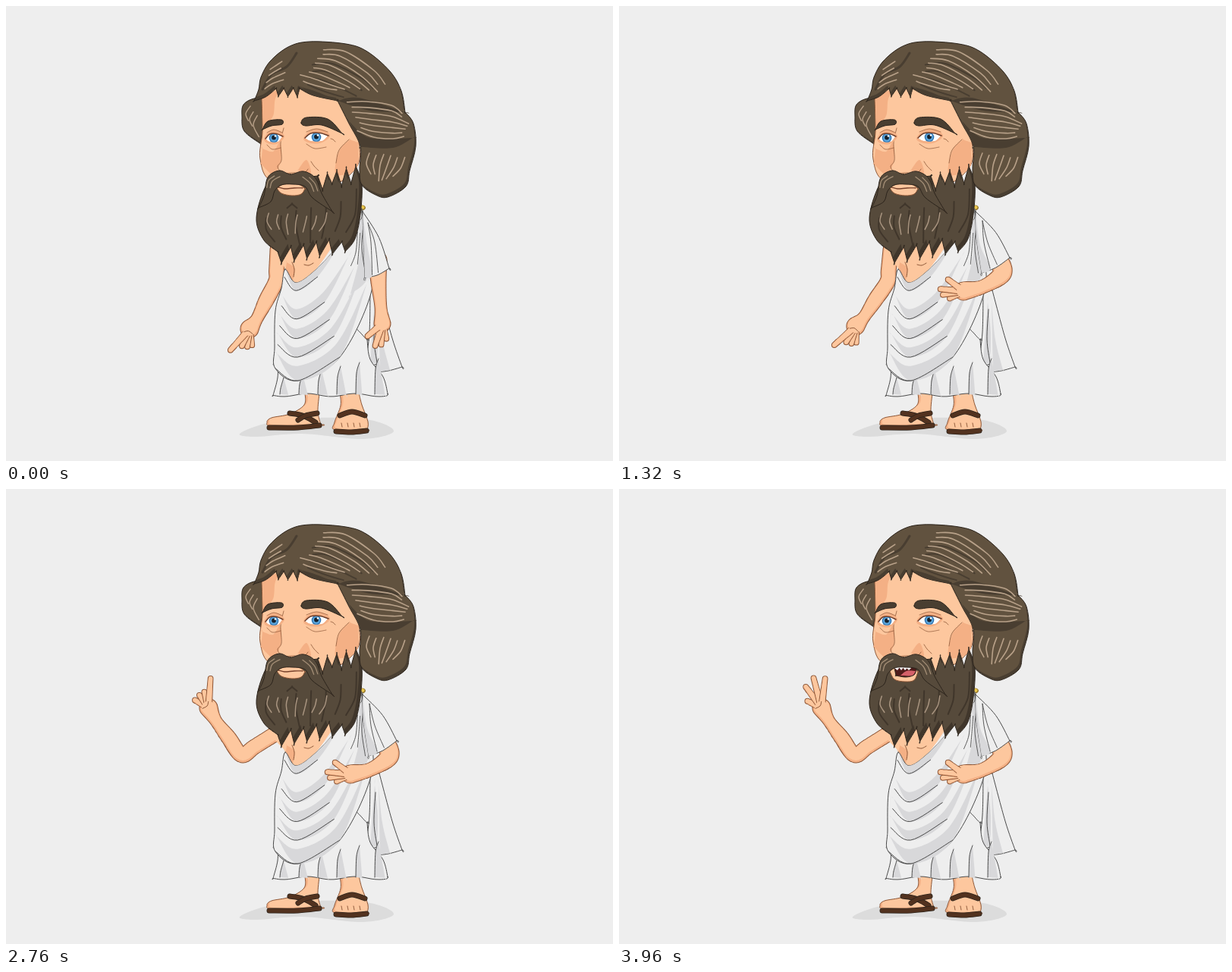
An HTML page with a canvas for the animation above (4.04 s loop, 800 by 600 pixels).

```html
<!DOCTYPE html>
<html lang="en">
<head>
<meta charset="utf-8">
<title>Talking philosopher</title>
<style>
html, body { margin: 0; width: 100%; height: 100%; overflow: hidden; background: #eee; }
canvas { display: block; width: 800px; height: 600px; }
</style>
</head>
<body>
<canvas id="stage" width="800" height="600"></canvas>
<script>
const ctx = document.getElementById('stage').getContext('2d');
const LOOP = 4040, TICK = 40;
const SKIN = '#fdc79e', SKIN2 = '#f4b085', SKINLINE = '#8b5637';
const HAIR = '#61523f', HAIR2 = '#493e31', BEARD = '#564a3b', BEARD2 = '#40362b';
const INK = '#2c241c', STRAND = '#b8a189', SOLE = '#52321f';
const CLOTH = '#eeeeee', CLOTH2 = '#d8d8da', CLOTHLINE = '#4b4b4b';

const unit = (t, a, b) => Math.max(0, Math.min(1, (t - a) / (b - a)));
const ease = (t, a, b) => { const u = unit(t, a, b); return u * u * (3 - 2 * u); };
const lerp = (a, b, k) => a.map((v, i) => v + (b[i] - v) * k);
const mix = (a, b, k) => a.map((p, i) => lerp(p, b[i], k));
const polar = ([x, y], deg, r) => [x + r * Math.cos(deg * Math.PI / 180), y + r * Math.sin(deg * Math.PI / 180)];
const noise = i => { const v = Math.sin(i * 12.9898 + 4) * 43758.5; return v - Math.floor(v); };

// Points are "x,y"; a trailing "!" marks a sharp corner.
const parse = s => s.split(' ').flatMap(p => {
  const q = p.replace('!', '').split(',').map(Number);
  return p.endsWith('!') ? [q, q] : [q];
});

// Sharp teeth from a to b; the gaps between them are moved by (dx, dy).
function teeth(a, b, n, dx, dy) {
  const pts = [];
  for (let i = 0; i < n; i++) {
    const tip = lerp(a, b, i / (n - 1));
    pts.push(tip, tip);
    if (i < n - 1) {
      const [x, y] = lerp(a, b, (i + .5) / (n - 1));
      const gap = [x + dx, y + dy * (.8 + .4 * noise(i + n))];
      pts.push(gap, gap);
    }
  }
  return pts;
}

function curve(src, closed) {
  const pts = typeof src === 'string' ? parse(src) : src;
  const path = new Path2D(), n = pts.length;
  const at = i => closed ? pts[(i + n) % n] : pts[Math.max(0, Math.min(n - 1, i))];
  path.moveTo(...pts[0]);
  for (let i = 0; i < (closed ? n : n - 1); i++) {
    const [a, b, c, d] = [at(i - 1), at(i), at(i + 1), at(i + 2)];
    path.bezierCurveTo(b[0] + (c[0] - a[0]) / 6, b[1] + (c[1] - a[1]) / 6,
      c[0] - (d[0] - b[0]) / 6, c[1] - (d[1] - b[1]) / 6, c[0], c[1]);
  }
  if (closed) path.closePath();
  return path;
}

function line(src, color, width = 1) {
  ctx.strokeStyle = color;
  ctx.lineWidth = width;
  ctx.stroke(curve(src, false));
}

// Fills a closed shape; with a shade, the main colour is shifted inside it.
function shape(src, fill, edge, shade, dx = 0, dy = 0) {
  const path = curve(src, true);
  ctx.save();
  if (shade) {
    ctx.clip(path);
    ctx.fillStyle = shade;
    ctx.fill(path);
    ctx.translate(dx, dy);
  }
  ctx.fillStyle = fill;
  ctx.fill(path);
  ctx.restore();
  if (edge) {
    ctx.strokeStyle = edge;
    ctx.lineWidth = 1;
    ctx.stroke(path);
  }
}

function band(src, color) {
  line(src, INK, 7);
  line(src, color, 5.4);
}

function oval(x, y, rx, ry, fill) {
  ctx.beginPath();
  ctx.ellipse(x, y, rx, ry, 0, 0, 7);
  ctx.fillStyle = fill;
  ctx.fill();
}

// A family of n locks between two guide curves, with uneven ends.
function locks(from, to, n, color, width) {
  const a = parse(from), b = parse(to);
  for (let i = 0; i < n; i++) {
    const pts = mix(a, b, i / (n - 1)), end = pts.length - 1;
    pts[0] = lerp(pts[0], pts[1], .5 * noise(i));
    pts[end] = lerp(pts[end], pts[end - 1], .5 * noise(i + 9));
    line(pts, color, width);
  }
}

// A rounded limb through joints [x, y, radius].
function limb(joints) {
  const dots = [], last = joints.length - 1;
  joints.slice(0, -1).forEach((b, i) => {
    const c = joints[i + 1], a = joints[Math.max(0, i - 1)], d = joints[Math.min(last, i + 2)];
    for (let u = 0; u <= 1; u += 1 / 24) {
      dots.push(b.map((v, j) => v + u / 2 * (c[j] - a[j] +
        u * (2 * a[j] - 5 * v + 4 * c[j] - d[j] + u * (3 * v - a[j] - 3 * c[j] + d[j])))));
    }
  });
  const pass = (color, grow, dy) => {
    ctx.beginPath();
    for (const [x, y, r] of dots) {
      ctx.moveTo(x + r + grow, y + dy);
      ctx.arc(x, y + dy, r + grow, 0, 7);
    }
    ctx.fillStyle = color;
    ctx.fill();
  };
  const inset = joints[last][2] < 6 ? .8 : 1.8;
  pass(SKINLINE, .5, 0);
  pass(SKIN2, -.5, 0);
  pass(SKIN, -inset, .5 - inset);
}

// Fingers are [angle from the hand, length].
function hand(palm, deg, fingers) {
  for (const [turn, length] of [...fingers].reverse()) {
    limb([[...polar(palm, deg + turn, 5), 4.4], [...polar(palm, deg + turn, length - 3.5), 3.4]]);
  }
  oval(palm[0], palm[1], 9, 9, SKIN);
}

function ground() {
  ctx.fillStyle = '#eeeeee';
  ctx.fillRect(0, 0, 800, 600);
  shape('308,564 345,550 410,543 480,546 511,561 470,571 390,564 330,568', '#dcdcdc');
}

function feet() {
  shape('394,510! 393,526 374,538 350,543 344,549 352,554 415,552! 411,535 413,510!', SKIN, SKINLINE, SKIN2, 3, -2);
  band('374,537 391,540 408,549', SOLE);
  band('410,537 395,540 385,546', SOLE);
  band('347,556 385,556 413,553', SOLE);
  shape('440,510! 441,527 433,549 434,559 476,559! 477,548 469,526 465,510!', SKIN, SKINLINE, SKIN2, 3, -2);
  band('440,540 456,535 473,540', SOLE);
  for (let x = 442; x < 472; x += 8) line([[x, 550], [x + 1, 555]], SKINLINE);
  band('435,561 455,562 475,560', SOLE);
}

function skirt() {
  shape('480,372! 479,430 474,471! 481,474 489,472! 487,483! 504,481 522,476! 509,438 492,375!', CLOTH, CLOTHLINE);
  shape('486,390! 480,470! 489,472! 490,430', CLOTH2);
  shape('491,390! 496,440 506,480! 493,482!', CLOTH2);
  line('487,400 485,440 489,470', CLOTHLINE);
  const hem = [];
  for (let x = 352; x <= 503; x += 10) hem.push([x, 513 + 2 * Math.sin((x - 350) / 10)]);
  shape([...parse('476,440! 440,420 358,470! 358,490'), hem[0], ...hem, [503, 511], [503, 511], ...parse('497,489 480,466')], CLOTH, CLOTHLINE);
  for (let i = 0; i < 6; i++) {
    const x = 364 + i * 25, top = 490 - i * 5, wide = 5 + 6 * noise(i + 2);
    const side = [[x + 2, top], [x - 2, top + 14], [x - 3, 512]];
    shape([side[0], ...side, side[2], [x + wide, 513], [x + wide, 513]], CLOTH2);
    line(side, CLOTHLINE);
  }
}

const NECK = parse('368,347 382,365 408,348 440,314');
const WAIST = parse('355,478 385,494 440,463 482,375');

function wrap() {
  shape('354,314! 353,328 366,343! 378,363 400,358 442,300!', SKIN);
  shape('370,338! 380,346 378,362! 368,352!', SKIN2);
  line('377,338 380,347 379,357', SKINLINE);
  line('393,341 399,342 405,339', SKINLINE);
  shape([...NECK, ...parse('466,285 469,271! 477,310'), ...[...WAIST].reverse(), ...parse('354,450 355,402 363,372')], CLOTH, CLOTHLINE);
  for (const [u, depth] of [[0, .08], [.27, .1], [.47, .1], [.66, .1], [.85, .15]]) {
    const a = mix(NECK, WAIST, u), b = mix(NECK, WAIST, u + depth);
    shape([a[0], ...a, a[3], b[2], b[1]], CLOTH2);
    line(b.slice(0, 3), CLOTHLINE);
  }
  shape('464,285! 467,325 454,380! 476,360 477,320 470,280!', CLOTH2);
  locks('464,290 461,325 450,355', '471,285 469,320 474,355', 3, CLOTHLINE, .9);
  oval(469, 266, 5, 3.5, '#927425');
  oval(468.5, 265.5, 4, 2.5, '#edc94f');
}

// Hanging, half raised and resting on the belly.
const REST = [
  { arm: [[490, 335, 12], [491, 365, 10], [494, 398, 8], [496, 419, 11]], turn: 95, hem: [[505, 346], [473, 358]] },
  { arm: [[496, 335, 13], [499, 356, 12], [486, 385, 10], [467, 411, 12]], turn: 165, hem: [[511, 333], [477, 352]] },
  { arm: [[500, 335, 13], [505, 353, 12], [480, 370, 9], [454, 376, 12]], turn: 172, hem: [[515, 332], [478, 352]] }
];
const RELAXED = [[45, 29], [13, 34], [-2, 31], [-20, 24]];

function restArm(t) {
  const i = t < 920 ? 0 : 1, from = REST[i], to = REST[i + 1];
  const k = i ? ease(t, 920, 1200) : ease(t, 440, 640);
  const arm = mix(from.arm, to.arm, k), [out, inn] = mix(from.hem, to.hem, k);
  limb(arm);
  hand(arm[3].slice(0, 2), from.turn + (to.turn - from.turn) * k, RELAXED);
  const top = [470, 271], edge = lerp(top, out, .5), hem = lerp(out, inn, .5);
  shape([top, top, [edge[0] + 4, edge[1] - 3], out, out, [hem[0], hem[1] + 3], inn, inn, [471, 305]], CLOTH, CLOTHLINE);
  shape([top, top, [476, 315], lerp(inn, out, .3), inn, inn, [471, 305]], CLOTH2);
  for (const u of [.3, .55]) {
    line([lerp(top, out, .2), [475 + 20 * u, 312], lerp(inn, out, u)], CLOTHLINE, .9);
  }
}

const FINGERS = {
  hook: [[15, 41], [-3, 28], [-20, 27], [-36, 25]],
  one: [[41, 42], [22, 25], [1, 24], [-24, 24]],
  three: [[44, 42], [22, 44], [0, 38], [-28, 24]]
};

function pointingArm(t) {
  const lift = ease(t, 1240, 1840);
  const name = t >= 2960 ? 'three' : t >= 2760 || (t >= 2240 && t < 2640) ? 'one' : 'hook';
  const upper = 93 + 55 * lift, fore = name === 'hook' ? 117 + 134 * lift : 233;
  const shoulder = [358, 321], elbow = polar(shoulder, upper, 42 + 14 * lift);
  const wrist = polar(elbow, fore, 56), palm = polar(elbow, fore + 2, 72 + 4 * lift);
  limb([[...shoulder, 10], [...lerp(shoulder, elbow, .65), 10], [...elbow, 10],
    [...lerp(elbow, wrist, .5), 10], [...wrist, 8], [...palm, 12]]);
  hand(palm, fore, FINGERS[name]);
  line([polar(palm, fore - 60, 8), polar(palm, fore, 3), polar(palm, fore + 35, 8)], SKINLINE);
}

function eye(x, y, w, lid, gaze) {
  const path = curve([[x - w, y + 1], [x - w, y + 1], [x - w / 2, y - 5], [x + w / 3, y - 5.5],
    [x + w, y - 2], [x + w, y - 2], [x + w / 2, y + 5], [x - w / 2, y + 5]], true);
  shape([[x - w - 2, y + 2], [x - w / 2, y - 9], [x + w / 2, y - 10], [x + w + 3, y - 2], [x + w / 2, y + 7], [x - w / 2, y + 8]], SKIN2);
  if (lid < 1) {
    const px = x + gaze[0], py = y + gaze[1];
    ctx.save();
    ctx.clip(path);
    ctx.fillStyle = '#ffffff';
    ctx.fill(path);
    oval(px, py, 6.3, 6.3, '#3273ad');
    oval(px, py, 5, 5, '#5aa5dc');
    oval(px, py - .5, 2.9, 2.9, '#16212e');
    oval(px + 2, py - 2.5, 1.3, 1.3, '#ffffff');
    if (lid) {
      ctx.fillStyle = SKIN2;
      ctx.fillRect(x - w, y - 9, 2 * w, 9);
    }
    ctx.restore();
  }
  const drop = 9 * lid;
  line([[x - w, y + 1 + drop * .5], [x - w / 2, y - 5 + drop * 1.4], [x + w / 3, y - 5.5 + drop * 1.4], [x + w + 1, y - 2 + drop * .6]], '#6a3c29', 1.5);
  line([[x - w + 2, y - 7], [x, y - 11], [x + w, y - 7]], SKINLINE, .7);
  line([[x - w + 2, y + 9], [x - 2, y + 15], [x + w - 2, y + 13]], SKINLINE, .7);
}

function face(lid, gaze) {
  shape('337,122! 338,165 335,202 352,232 420,240 461,214 465,180 450,140 437,120 390,100 345,108', SKIN, SKINLINE);
  shape('338,120! 365,108 355,122 352,145 339,160!', SKIN2);
  shape('338,188! 352,192 361,180 362,205 352,222 336,208!', SKIN2);
  shape('453,176! 439,192 435,222 462,214 464,180!', SKIN2);
  shape('385,216! 396,203 402,221 390,222', SKIN2);
  line('366,161 362,180 363,203 358,212 365,220 380,220 392,221 398,215', SKINLINE, .8);
  line('452,176 439,190 435,207', SKINLINE, .8);
  line('402,205 406,211 412,217', SKINLINE, .8);
  line('428,175 431,176 434,179', SKINLINE, .8);
  eye(353, 174, 11, lid, gaze);
  eye(409, 173, 15, lid, gaze);
  shape('338,163! 345,152 363,150 364,156 350,158', HAIR2, INK);
  shape('389,154 396,147 424,149 443,168! 416,157 395,158', HAIR2, INK);
}

function mouth(kind) {
  const open = kind === 'open' ? 4 : 0;
  shape([...parse('357,240! 366,235 385,235 394,241!'), [389, 248 + open], [377, 250 + open], [363, 247 + open]], SKIN, SKINLINE);
  if (open) {
    shape('363,236! 377,234 392,237! 389,245 378,248 365,246!', '#501c1b', INK);
    shape('371,246! 379,240 391,240! 386,246', '#d4616a');
    shape([...teeth([367, 239], [382, 239], 4, 0, -3), [384, 235], [364, 235]], '#ffffff');
  } else {
    if (kind === 'teeth') shape('363,237! 385,235! 387,239 375,241 364,240', '#ffffff');
    line('359,239 367,241 380,240 391,240', '#75402a', 1.3);
  }
}

function beard(kind) {
  shape([...teeth([411, 224], [461, 211], 5, 0, 18), ...parse('469,235 467,275 460,307'),
    ...teeth([447, 324], [363, 339], 6, 4, -17), ...parse('358,324! 340,309 330,283 337,250 350,230 380,228')],
    BEARD, INK, BEARD2, -4, -4);
  locks('343,275 343,295 362,322', '462,240 460,275 440,314', 7, BEARD2, 2);
  locks('347,270 344,284 354,302', '423,272 420,286 408,304', 7, '#a99580', 1.5);
  line(teeth([371, 266], [383, 266], 2, 0, -5), BEARD2, 2);
  mouth(kind);
  shape('375,222 360,217 345,226 340,250 333,266! 349,258 354,244 363,236 377,235 394,238 404,253 430,271! 416,247 408,227 392,218', BEARD, INK);
  locks('364,223 351,231 346,246', '358,221 346,230 342,247', 2, '#a28d75', 1.3);
  locks('388,223 401,234 409,252', '396,222 407,234 414,252', 2, '#a28d75', 1.3);
}

function hairBack() {
  shape('345,122! 327,122 313,130 311,145 314,165 336,182! 345,150', HAIR, INK, HAIR2, -2, -3);
  locks('324,129 316,142 322,158', '333,140 326,157 334,174', 3, STRAND, 1.4);
}

function hairFront() {
  shape([...parse('437,125! 452,155 467,185 466,215 469,236 487,249 503,252 527,238 532,217 540,185 537,155 526,140! 521,112 506,86 476,60 448,50 400,47 372,54 348,73 336,94 333,110 327,125! 342,120 356,109!'),
    ...teeth([359, 119], [384, 120], 3, 1, -10), ...parse('387,109! 405,118')], HAIR, INK, HAIR2, -2, -4);
  shape('390,107! 412,114 437,125! 465,121 525,140! 480,138 437,125! 405,118', HAIR2);
  shape('452,152! 480,174 536,174! 510,187 468,186!', HAIR2);
  line('383,62 370,80 350,90 338,110', HAIR2, 3);
  locks('396,78 430,76 470,96 494,117', '392,101 410,109 430,116 448,121', 4, HAIR2, 2);
  locks('346,85 355,79 370,69', '337,112 350,103 369,96', 4, STRAND, 1.6);
  locks('410,57 447,60 485,85 510,116', '383,96 402,103 424,109 446,112', 8, STRAND, 1.6);
  locks('442,127 475,126 508,131 532,149', '462,164 485,173 510,175 534,170', 7, STRAND, 1.6);
  locks('480,190 475,208 485,231', '529,191 520,214 500,235', 6, STRAND, 1.6);
}

const MOUTHS = ['open', 'teeth', 'shut'];
const SPEECH = [[520, 720], [1000, 1240], [1400, 1640], [1960, 2200], [2960, 3200], [3720, 4040]];

function mouthAt(t) {
  if (t >= 3440 && t < 3520) return 'teeth';
  const said = SPEECH.find(([a, b]) => t >= a && t < b);
  return said ? MOUTHS[Math.floor((t - said[0]) / 80) % 3] : 'shut';
}

function head(t) {
  const back = ease(t, 440, 640) - ease(t, 920, 1240);
  const forth = ease(t, 2920, 3240) - ease(t, 3640, 3960);
  const lid = Math.min(1, 2 * (unit(t, 480, 600) - unit(t, 680, 800)));
  const gaze = [t >= 2240 && t < 2640 ? -2 : 0, -1.5 * forth];
  ctx.save();
  ctx.translate(420, 230 + back);
  ctx.rotate(3.2 * (forth - back) * Math.PI / 180);
  ctx.translate(-420, -230);
  hairBack();
  face(lid, gaze);
  beard(mouthAt(t));
  hairFront();
  ctx.restore();
}

function draw(now) {
  const t = Math.floor((now % LOOP) / TICK) * TICK;
  ground();
  feet();
  skirt();
  pointingArm(t);
  wrap();
  restArm(t);
  head(t);
}

ctx.lineJoin = ctx.lineCap = 'round';
const begin = performance.now();
function frame() {
  draw(performance.now() - begin);
  requestAnimationFrame(frame);
}
frame();
</script>
</body>
</html>
```
